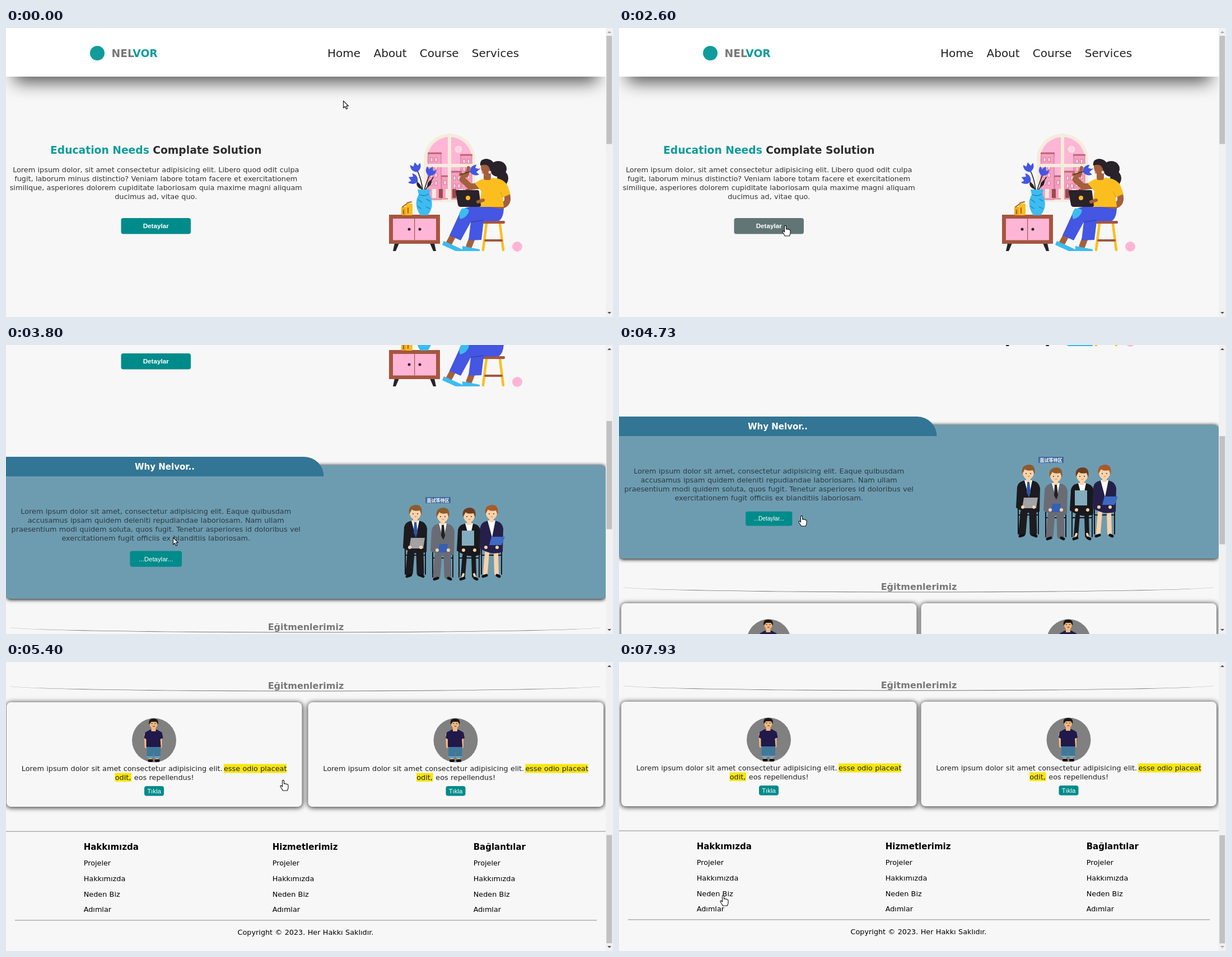
An HTML page for the animation above (8 s loop, 1084 by 517 pixels).

```html
<!DOCTYPE html>
<html lang="tr">
<head>
<meta charset="utf-8">
<title>Education page</title>
<style>
  html, body { margin: 0; width: 100%; height: 100%; overflow: hidden; background: #f7f7f7; }
  svg { display: block; width: 1084px; height: 517px; }
  text { font-family: "DejaVu Sans", Verdana, sans-serif; white-space: pre; }
  .body { font-size: 12.8px; word-spacing: .024em; }
  .nav { font-size: 20px; }
  .h3 { font-size: 18.72px; font-weight: bold; }
  .h4 { font-size: 15px; font-weight: bold; }
  .h2 { font-size: 16px; font-weight: bold; }
  .btn { font: 11.4px "Liberation Sans", Arial, sans-serif; }
  .strong { font-weight: bold; font-size: 11.7px; }
  .sign { font: bold 8px "Noto Sans CJK SC", "Noto Sans CJK", sans-serif; }
  .mid { text-anchor: middle; }
</style>
</head>
<body>
<svg id="stage" viewBox="0 0 1084 517"></svg>
<script>
const TEAL = '#109c9c', BUTTON = '#008b8b', HOVER = '#617575', BG = '#f7f7f7';
const BROWN = '#a5563f', PINK = '#ffb5d6', YELLOW = '#fcbe1f', BLUE = '#4456e2',
      SKY = '#3cbcf0', INK = '#29222a', SKIN = '#a4603c', CREAM = '#f4ecdd';
const W = 1071, HALF = W / 2, LEFT = W / 4;
const LOOP = 8000, STEP = 1000 / 15;

const rect = (x, y, w, h, fill, r = 0, more = '') =>
  `<rect x="${x}" y="${y}" width="${w}" height="${h}" rx="${r}" fill="${fill}" ${more}/>`;
const oval = (x, y, rx, fill, ry = rx, more = '') =>
  `<ellipse cx="${x}" cy="${y}" rx="${rx}" ry="${ry}" fill="${fill}" ${more}/>`;
const shape = (d, fill) => `<path d="${d}" fill="${fill}"/>`;
const stroke = (d, color, w = 1) =>
  `<path d="${d}" fill="none" stroke="${color}" stroke-width="${w}" stroke-linecap="round" stroke-linejoin="round"/>`;
const text = (x, y, str, cls, fill = '#222', more = '') =>
  `<text x="${x}" y="${y}" class="${cls}" fill="${fill}" ${more}>${str}</text>`;
const group = (id, content, x = 0, y = 0) =>
  `<g id="${id}" transform="translate(${x} ${y})">${content}</g>`;
const shadow = (x, y, w, h, r, sigma, fill) =>
  rect(x, y, w, h, fill, r, `style="filter:blur(${sigma}px)"`);
const lines = (y, rows, fill) =>
  rows.map((row, i) => text(LEFT, y + 16 * i, row, 'body mid', fill)).join('');

const flower = (x, y, tilt) => `<g transform="translate(${x} ${y}) rotate(${tilt})">` +
  shape('M0 8 Q-11 4 -9 -7 L-4 -3 L0 -10 L4 -3 L9 -7 Q11 4 0 8Z', BLUE) + '</g>';

function townWindow() {
  const houses = [[754, 223, 23, 84], [812, 226, 20, 80], [778, 264, 16, 42], [795, 256, 18, 50]];
  let s = shape('M746 311 V235 A46 46 0 0 1 838 235 V311Z', CREAM) +
    shape('M752 305 V235 A40 40 0 0 1 832 235 V305Z', PINK) +
    oval(808, 217, 5.5, '#ffd3e6', 5.5, `stroke="${CREAM}" stroke-width="1.5"`);
  for (const [x, y, w, h] of houses) {
    s += rect(x, y, w, h, '#f79fc4', 0, 'stroke="#c87589"') + rect(x - 1, y, w + 2, 2.5, '#b8656c');
    for (let v = y + 9; v < 286; v += 14)
      for (let u = x + 4; u < x + w - 4; u += 8) s += rect(u, v, 4, 7, '#ffd9e9', 0, 'stroke="#b8656c" stroke-width=".7"');
  }
  for (let x = 761; x < 830; x += 12) s += rect(x, 288, 7, 16, x % 24 < 12 ? '#9b4a4b' : CREAM);
  return s + rect(789, 191, 6, 116, CREAM) + rect(749, 243, 86, 6, CREAM);
}

function cabinet() {
  return shape('M694 385h8l-6 14h-5zM757 385h8l3 14h-5z', INK) +
    rect(684, 334, 91, 52, BROWN) + rect(691, 341, 77, 38.5, PINK) + rect(729, 341, 1.2, 38, BROWN) +
    oval(720, 360, 2.5, INK) + oval(739, 360, 2.5, INK) +
    rect(706, 320, 11, 15, '#f0a91c', 2) + rect(714, 314, 12, 21, YELLOW, 2) +
    stroke('M708 320L715 315M716 313L724 311M718 322V331M710 326V332', '#a85b24', 2) +
    stroke('M744 290Q742 270 734 254M747 290Q752 272 757 262M743 290Q739 277 728 271M749 290L763 267', INK, 1.6) +
    shape('M733 277q8 0 9 11q-9-2-9-11zM760 271q2 10-8 14q0-10 8-14z', INK) +
    flower(732, 250, -12) + flower(758, 257, 22) + flower(728, 271, -65) +
    shape('M735 289H758L756 297Q767 318 753 335H740Q727 316 737 298Z', SKY) +
    stroke('M738 298Q747 302 755 297M736 307L743 312M751 306L757 310M735 319L741 323M750 320L757 323', '#1e7fb0', 1.3);
}

function reader() {
  return stroke('M858 350L852 397M882 350L888 397', YELLOW, 4.5) + stroke('M856 380H885', BROWN, 4) +
    rect(848, 345, 43, 5, BROWN, 2) +
    oval(879, 252, 15, INK, 14) + oval(887, 269, 10, INK, 13) +
    stroke('M848 282L829 284L815 271', SKIN, 11) + stroke('M815 272L823 258M823 264L826 250M818 264L812 262', SKIN, 6) +
    stroke('M812 262L846 252', INK, 1.3) + flower(836, 255, 75) +
    stroke('M799 370L790 387M834 372L827 390', SKIN, 11) +
    shape('M782 381L817 397V399H803L779 388ZM815 390L846 396V399H815Z', SKY) +
    shape('M889 319L842 319Q812 319 809 334L792 371L812 380L830 347L826 380L849 379L853 346L880 345Q889 340 889 319Z', BLUE) +
    shape('M814 323Q825 321 827 327Q824 339 811 342Q807 332 814 323Z', SKY) + stroke('M830 347L852 344', '#2c37a0', 1) +
    stroke('M894 296Q900 315 884 318L849 312', SKIN, 11) +
    shape('M837 278Q848 270 853 270Q861 275 868 268Q890 269 896 283L901 297L887 303L889 320H845L849 292Z', YELLOW) +
    stroke('M887 303L883 293', '#d99a12', 1) +
    rect(853, 258, 13, 14, SKIN, 4) + oval(858, 248, 10, SKIN, 14) +
    shape('M847 246Q845 235 857 234Q873 235 872 250L867 260L863 250Q860 242 847 246Z', INK) +
    oval(864, 258, 2.5, '#ffdcea') + stroke('M850 259L853 260', '#e35a4f', 1.5) +
    shape('M805 290L842 290Q845 290 845 294L848 317Q848 320 844 320H812Q808 320 807 316L803 293Q803 290 805 290Z', INK) +
    oval(825, 304, 4, YELLOW) + stroke('M843 311L852 308', SKIN, 6) + oval(913, 391, 9, PINK);
}

// A seated candidate; look = colours and folder box.
function candidate(x, y, { hair, suit, tie, folder, box, bare }) {
  const skin = '#fbd2a8', leg = bare === 'full' ? skin : suit;
  return group('', stroke('M-18 62V112M18 62V112M-18 78H18', '#151519', 2) +
    stroke('M-8 74L-11 110M8 74L9 110', leg, bare ? 8 : 13) +
    (bare ? stroke('M-10 107L-12 112M9 107L11 112', skin, 4) : '') +
    stroke('M-9 114L-15 116M10 114L14 116', '#111', 5) +
    shape('M-9 17Q-18 19 -20 28L-22 65Q0 80 20 72L21 30Q19 19 9 17L0 15Z', suit) +
    shape('M-7 16H7L1 46Z', '#fff') + (tie ? shape('M-2 19H2L4 38L1 46L-3 38Z', tie) : '') +
    rect(-4, 10, 8, 9, skin) + oval(0, 3, 10, skin, 11) +
    shape('M-11 5Q-14 -11 1 -12Q14 -12 11 6L8 -2Q-3 0 -6 -4Z', hair) +
    oval(-4, 4, 1, '#333') + oval(4, 4, 1, '#333') + stroke('M-1 9H2', '#d46a55', 1) +
    shape(box, folder) + oval(-10, 64, 3, skin) + oval(10, 64, 3, skin), x, y);
}

const candidates = () => rect(749, 346, 45, 11, '#41699c') + text(771.5, 354.5, '面试等待区', 'sign mid', '#fff') +
  candidate(731, 372, { hair: '#8d5b2d', suit: '#1c1b20', tie: '#2d55a8', folder: '#a3a3a5', box: 'M-8 47H17L14 66H-11Z' }) +
  candidate(780, 377, { hair: '#8d5b2d', suit: '#6a6c75', tie: '#222', folder: '#345fb5', box: 'M-6 53H9L7 68H-9Z' }) +
  candidate(827, 377, { hair: '#6d3d20', suit: '#19191d', folder: '#83adbf', box: 'M-13 29H9V56H-13Z', bare: true }) +
  candidate(867, 372, { hair: '#a65b2b', suit: '#25204a', folder: '#3e6ac2', box: 'M0 45H24L18 60H-4Z', bare: 'full' });

function trainer(x, y) {
  const skin = '#f3b77f';
  return oval(x, y, 39.5, '#808080') + group('', stroke('M-15 -10L-14 12M13 -10L13 12', skin, 4) +
    stroke('M-6 28V35M6 28V35', skin, 6) + rect(-10, 34, 9, 5, '#15131d', 2) + rect(2, 34, 9, 5, '#15131d', 2) +
    shape('M-12 10H13L12 32H1L0 20L-1 32H-12Z', '#40789a') + rect(-12, 29, 11, 2, '#73b5d3') + rect(1, 29, 11, 2, '#73b5d3') +
    shape('M-6 -19H6L15 -14L17 -4L12 -2L13 12H-13V-2L-17 -4L-15 -14Z', '#20194a') +
    rect(-4, -22, 8, 6, skin) + oval(0, -29, 7, skin, 8) +
    shape('M-8 -28Q-10 -39 0 -39Q10 -39 8 -28L5 -33H-4Z', '#1a1717') +
    stroke('M-4 -30H-2M2 -30H4M-1 -25H2', '#3a2521', 1), x - 1, y);
}

function card(id, dx) {
  return group(id, group('', shadow(3, 859, 530, 189, 9, 4.5, '#3a3a3a') + rect(4, 859, 527.5, 187, BG, 8) +
    trainer(267.5, 927) +
    rect(391.8, 969.5, 112, 16, '#f8e60a') + rect(197.5, 985.5, 29.5, 15.5, '#f8e60a') +
    text(30.8, 982, 'Lorem ipsum dolor sit amet consectetur adipisicing elit.', 'body') +
    text(392, 982, 'esse odio placeat', 'body') + text(197.7, 998, 'odit,', 'body') +
    text(231.8, 998, 'eos repellendus!', 'body') +
    rect(250, 1009, 35, 17.5, BUTTON, 4) + text(267.5, 1021.5, 'Tıkla', 'btn mid', '#fff'), dx));
}

const footer = () => [[138.7, 'Hakkımızda'], [475.7, 'Hizmetlerimiz'], [834.7, 'Bağlantılar']].map(([x, title]) =>
  text(x, 1122.5, title, 'h4', '#000') + ['Projeler', 'Hakkımızda', 'Neden Biz', 'Adımlar'].map((s, i) =>
    text(x, 1151 + 27.8 * i, s, 'body', '#000')).join('')).join('');

const navItems = [[574, 'Home'], [656.5, 'About'], [738.8, 'Course'], [831.8, 'Services']];

const page = shadow(15, 20, W - 30, 77, 0, 15, '#555') + rect(0, 0, W, 87, '#fff') +
  oval(163, 45, 13, TEAL) +
  text(188.5, 52, `NEL<tspan fill="${TEAL}">VOR</tspan>`, 'h3', '#777') +
  navItems.map(([x, s], i) => text(x, 52, s, 'nav', '#222', `id="nav${i}"`)).join('') +
  text(LEFT, 225, `<tspan fill="${TEAL}">Education Needs</tspan> Complate Solution`, 'h3 mid', '#2d2d2d') +
  lines(258, ['Lorem ipsum dolor, sit amet consectetur adipisicing elit. Libero quod odit culpa',
    'fugit, laborum minus distinctio? Veniam labore totam facere et exercitationem',
    'similique, asperiores dolorem cupiditate laboriosam quia maxime magni aliquam',
    'ducimus ad, vitae quo.'], '#333') +
  rect(205.5, 340, 124.5, 28.5, BUTTON, 4, 'id="heroBtn"') + text(LEFT, 358, 'Detaylar', 'btn strong mid', '#fff') +
  townWindow() + cabinet() + reader() +
  shadow(0, 540, W, 241, 8, 3, '#222') + rect(0, 540, W, 239, '#6d9cb1', 8) +
  shape('M0 525H532.5A35 35 0 0 1 567.5 560H0Z', '#327594') +
  text(283.5, 548, 'Why Nelvor..', 'h4 mid', '#fff') +
  lines(627, ['Lorem ipsum dolor sit amet, consectetur adipisicing elit. Eaque quibusdam',
    'accusamus ipsam quidem deleniti repudiandae laboriosam. Nam ullam',
    'praesentium modi quidem soluta, quos fugit. Tenetur asperiores id doloribus vel',
    'exercitationem fugit officiis ex blanditiis laboriosam.'], '#2c3a40') +
  group('whyBtn', rect(-46.3, -14.2, 92.6, 28.4, BUTTON, 4) + text(0, 4, '...Detaylar...', 'btn mid', '#fff'), LEFT, 707.6) +
  group('', candidates(), 0, 251) +
  text(HALF, 835, 'Eğitmenlerimiz', 'h2 mid', '#777') +
  shape(`M0 829A${HALF} 10.5 0 0 0 ${W} 829A${HALF} 9.5 0 0 1 0 829Z`, '#777') +
  card('card0', 0) + card('card1', HALF) +
  rect(0, 1089.5, W, 1, '#888') + footer() + rect(16, 1248.5, 1039, 1, '#888') +
  text(535, 1275, 'Copyright © 2023. Her Hakkı Saklıdır.', 'body mid', '#000');

const pointer = 'fill="#fff" stroke="#111" stroke-width="1.1" stroke-linejoin="round"';
const cursor = `<path id="arrow" d="M.5 .5V13L3.4 10.3L5.6 15L7.8 14L5.7 9.5H9.5Z" ${pointer}/>` +
  `<path id="hand" d="M-1.5 12V1.5Q0 -.8 1.5 1.5V7Q3 5.5 4.2 7.4Q6 6.2 7 8.2Q8.8 7.4 9 9.6V14Q8.6 16.5 7.4 19H-.8Q-2 16 -5 12Q-5.4 9.4 -3 10.4Z" ${pointer}/>`;

const stage = document.getElementById('stage');
stage.innerHTML = rect(0, 0, 1084, 517, BG) + group('page', page) +
  rect(W, 0, 13, 517, '#f1f1f1') + rect(1072.3, 14, 10, 193.5, '#c1c1c1', 0, 'id="thumb"') +
  '<path id="up" d="M1074 9L1077.5 5.5L1081 9Z"/><path id="down" d="M1074 508L1077.5 511.5L1081 508Z"/>' +
  group('cursor', cursor);

// Motion tables: time, then values.
const scrollKeys = [[2600, 0], [2670, 8], [2800, 72], [2930, 108], [3070, 185], [3200, 208], [3333, 251], [3467, 298],
  [3733, 298], [3800, 325], [3867, 375], [3933, 397], [4867, 397], [4933, 420], [5133, 600], [5333, 772], [5400, 787], [5467, 788]];
const cursorKeys = [[0, 602, 130], [400, 602, 50], [600, 636, 50], [870, 700, 52], [1070, 745, 56], [1430, 812, 60],
  [1733, 890, 62], [1800, 880, 66], [2200, 560, 200], [2530, 310, 340], [2600, 297, 353], [2800, 298, 350], [3467, 298, 350],
  [3533, 298, 344], [4000, 298, 344], [4270, 270, 312], [4470, 285, 316], [4733, 326, 305], [4867, 436, 258],
  [4933, 440, 258], [5400, 495, 211], [5800, 495, 211], [6200, 700, 190], [6600, 496, 207], [6733, 480, 207],
  [7130, 300, 240], [7530, 180, 364], [7600, 178, 366], [7933, 186, 417]];
const handTimes = [[370, 610], [670, 960], [1070, 1430], [1500, 1830], [2500, 2760], [4200, 4790], [5330, 7200], [7560, 8000]];
const navTimes = handTimes.slice(0, 4);
const whyScale = [[4200, 1], [4400, .9], [4740, .9], [4867, 1]];
const cardShift = [
  [[5270, 0], [5340, -3], [5860, -3], [6000, 0], [6600, 0], [6867, -3], [7200, -3], [7333, 0]],
  [[6000, 0], [6130, -3], [6330, -3], [6460, 0]]];

function at(keys, t, col = 1) {
  const i = keys.findIndex(k => k[0] > t);
  if (i === 0) return keys[0][col];
  if (i < 0) return keys[keys.length - 1][col];
  const a = keys[i - 1], b = keys[i];
  return a[col] + (b[col] - a[col]) * (t - a[0]) / (b[0] - a[0]);
}
const within = ([from, to], t) => t >= from && t < to;
const set = (id, name, value) => document.getElementById(id).setAttribute(name, value);
const move = (id, x, y = 0, more = '') => set(id, 'transform', `translate(${x} ${y}) ${more}`);

function render(t) {
  const y = Math.round(at(scrollKeys, t)), hand = handTimes.some(span => within(span, t));
  move('page', 0, -y);
  set('thumb', 'y', 14 + .3755 * y);
  set('up', 'fill', y > 0 ? '#505050' : '#a3a3a3');
  set('down', 'fill', y < 788 ? '#505050' : '#a3a3a3');
  navTimes.forEach((span, i) => set('nav' + i, 'fill', within(span, t) ? TEAL : '#222'));
  set('heroBtn', 'fill', within([2530, 2780], t) ? HOVER : BUTTON);
  move('whyBtn', LEFT, 707.6, `scale(${at(whyScale, t)})`);
  cardShift.forEach((keys, i) => move('card' + i, at(keys, t)));
  move('cursor', Math.round(at(cursorKeys, t)), Math.round(at(cursorKeys, t, 2)));
  set('arrow', 'visibility', hand ? 'hidden' : 'visible');
  set('hand', 'visibility', hand ? 'visible' : 'hidden');
}

const start = performance.now();
function tick() {
  const t = (performance.now() - start) % LOOP;
  render(Math.floor((t + 4) / STEP) * STEP % LOOP);
  requestAnimationFrame(tick);
}
tick();
</script>
</body>
</html>
```
